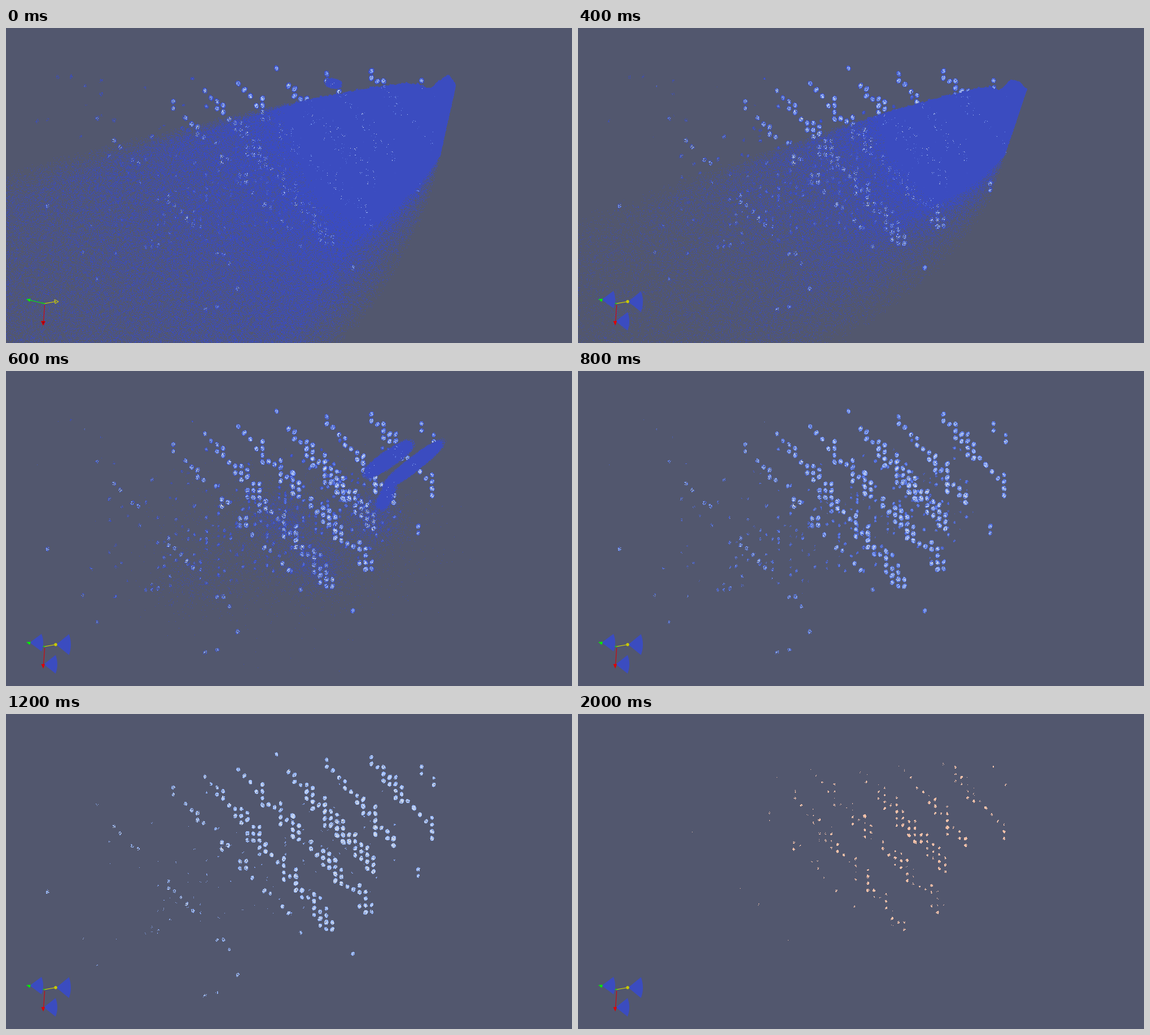
Animation, 1003 px wide and 559 px high, one loop 2100 ms. Source, as a matplotlib script:

```python
import numpy as np
import matplotlib
import matplotlib.pyplot as plt
from matplotlib.animation import FuncAnimation
from matplotlib.patches import Circle, Polygon

W, H, DPI = 1003, 559, 64
FRAMES, STEP = 21, 100
BACK = np.array([82, 87, 110], np.uint8)
BLUE = np.array([59, 76, 192], np.uint8)
DX, DY = 10.75, 12.2  # lattice pitch on screen

rng = np.random.default_rng(12)
X, Y = np.meshgrid(np.arange(W), np.arange(H))
dist = np.hypot(X - 770, Y - 110)

# Diagonal chains of clumps: x, y, steps, slope per step, longest column, share
CHAINS = [(736, 99, 5, 10.0, 1, 0.8), (647, 82, 11, 12.0, 4, 1.0),
          (568, 87, 12, 12.7, 5, 1.0), (500, 102, 15, 11.8, 4, 1.0),
          (411, 98, 23, 11.2, 3, 0.9), (352, 111, 22, 12.6, 4, 0.9),
          (296, 136, 22, 11.4, 2, 0.6), (191, 199, 20, 11.5, 1, 0.4)]
LONE = [(479, 71), (730, 275), (730, 287), (73, 315), (136, 398), (161, 445),
        (352, 499), (374, 494), (410, 462), (614, 425)]


def chain(x, y, steps, slope, longest, share):
    """Walk down a diagonal; columns get longer along the way."""
    for k in range(steps):
        rows = rng.integers(1, 2 + min(longest, 1 + k // 2))
        top = y + slope * k - DY * (rows - 1) / 2
        for r in range(rows):
            if k == 0 or rng.random() < share:
                yield x + DX * k, top + DY * r


def strength(x, y):
    """Clumps are strongest in the middle and weaken outwards."""
    dy = y - 205
    q = np.hypot((x - 620) / 1.3, dy * (1.7 if dy < 0 else 1))
    return 0.79 - 0.0011 * q + rng.normal(0, 0.07)


def weak_clumps(n):
    x = np.round((140 + 560 * rng.beta(1.8, 1.2, n)) / DX) * DX
    y = 335 - 0.2 * (x - 140) + rng.normal(0, 1, n) * (78 - 0.05 * x)
    return zip(x, y, rng.uniform(0.02, 0.26, n))


def faint_clumps(n):
    x = rng.uniform(50, 350, n)
    y = rng.uniform(85, 200, n)
    return zip(x, y, rng.uniform(-0.32, 0.04, n))


fill = np.clip(1.5 - dist / 600, 0.5, 0.94)
value = np.full((H, W), -9.0)


def add_clump(x, y, peak):
    sx, sy = rng.uniform(0.8, 1.0), rng.uniform(0.95, 1.15)
    tilt = rng.uniform(-0.2, 0.3)
    x0, y0 = max(int(x) - 9, 0), max(int(y) - 9, 0)
    box = np.s_[y0:y0 + 19, x0:x0 + 19]
    dx, dy = X[box] - x, Y[box] - y
    r = np.hypot((dx + tilt * dy) / sx, dy / sy)
    value[box] = np.maximum(value[box], peak - (r / 5.6) ** 2.5)


for c in CHAINS:
    for x, y in chain(*c):
        add_clump(x, y, strength(x, y))
for x, y in LONE:
    add_clump(x, y, min(strength(x, y), 0.5))
for x, y, peak in [*weak_clumps(260), *faint_clumps(18)]:
    add_clump(x, y, peak)

value += rng.normal(0, 1, (H, W)) * (0.04 + 0.12 * (1 - fill))
value[rng.random((H, W)) > fill] = -9
shade = rng.random((H, W)) ** 1.2
cover = rng.random((H, W))

# Half ordered, half random grain
cell = (2 * (X % 2) + 3 * (Y % 2)) % 4
grain = rng.random((H, W))
grain = np.where(rng.random((H, W)) < 0.5, (cell + grain) / 4, grain)
jag = np.repeat(rng.normal(0, 1, W // 4 + 1), 4)[:W]


def bulk(k):
    """Grain density of the whole body while it shrinks, k from 0 to 1."""
    rest = np.clip(1 - X / (700 + 35 * k), 0, 1)
    top = 97 + 4 * k + (153 + 77 * k) * rest ** 1.17 + jag
    top += np.clip(10 - np.abs(X - 748) / 2, 0, 8)
    top -= np.clip(15 - 3 * k - np.abs(X - 785 + 17 * k) / 2, 0, 15)
    top += np.clip(X - 785, 0, None) * (1 - 0.4 * k)
    low = np.clip(Y - 250, 0, None)
    side = 796 - 0.22 * (Y - 108) - 0.001 * low ** 2
    side = side - k * (15 * np.clip((Y - 108) / 130, 0, 1) + 0.0012 * low ** 2)
    over = np.clip((Y - top) / (2 + 58 * np.clip(1 - X / 530, 0, 1)), 0, 1)
    soft = 2 + (0.7 + 0.4 * k) * np.clip(Y - 225, 0, 170)
    right = np.clip((side - X) / soft, 0, 1)
    return (2.2 + k) * np.exp(-dist / (350 - 145 * k)) * over * right


def lobe(x, y, length, width, deg):
    a = np.radians(deg)
    u = ((X - x) * np.cos(a) + (Y - y) * np.sin(a)) / length
    v = ((Y - y) * np.cos(a) - (X - x) * np.sin(a)) / width
    q = (np.abs(u) ** 2.6 + np.abs(v) ** 2.6) ** (1 / 2.6)
    return np.clip((1.08 - q) * 6, 0, 2)


def haze(x, y, sx, sy, amp):
    return amp * np.exp(-((X - x) / sx) ** 2 / 2 - ((Y - y) / sy) ** 2 / 2)


REMNANT = (lobe(677, 156, 53, 15, -35) + lobe(722, 165, 67, 13, -38)
           + lobe(673, 222, 28, 14, -62) * 0.45
           + haze(650, 260, 26, 28, 0.42) + haze(490, 262, 28, 28, 0.3)
           + haze(555, 345, 26, 26, 0.3) + haze(510, 305, 100, 55, 0.09)
           + haze(340, 375, 38, 26, 0.08))


def density(i):
    if i <= 4:
        bump = lobe(580, 98, 15 - 2 * i, 9 - i, 10) * (i < 3)
        return np.maximum(bulk(i / 4), bump)
    if i == 5:
        return np.sqrt(bulk(1.25) * REMNANT)
    return REMNANT * 0.14 ** (i - 6) * (i < 8)


cmap = matplotlib.colormaps["coolwarm"]


def cloud(i):
    """Keep the points whose value passes the rising threshold."""
    limit = 0.61 - 0.0475 * (20 - i)
    low = max(limit, 0)
    img = np.empty((H, W, 3), np.uint8)
    img[:] = BACK
    d = density(i)
    img[grain < d] = BLUE
    seen = (value > limit) & (cover > 0.95 * np.minimum(d, 1))
    tone = low + (value[seen] - low) * shade[seen]
    tone = np.clip(tone, 0, max(0.48, limit + 0.03))
    img[seen] = cmap(tone, bytes=True)[:, :3]
    return img


fig = plt.figure(figsize=(W / DPI, H / DPI), dpi=DPI)
ax = fig.add_axes([0, 0, 1, 1])
ax.axis("off")
pic = ax.imshow(cloud(0), extent=(0, W, H, 0), interpolation="nearest",
                aspect="auto")
ax.set_xlim(0, W)
ax.set_ylim(H, 0)

GREEN, YELLOW, RED = "#00f000", "#d8d800", "#e00000"


def line(pts, color):
    return ax.plot(*zip(*pts), color=color, lw=1.2, zorder=3)[0]


def shape(pts, face, edge="none", z=4):
    return ax.add_patch(Polygon(pts, fc=face, ec=edge, lw=1.1, zorder=z))


def fan(x, y, w, h):
    t = np.linspace(-1, 1, 9)
    arc = np.column_stack([x + w * (1 - 0.13 * t ** 2), y + h * t])
    return shape([(x, y), *arc], BLUE / 255)


line([(68, 489), (88, 485.5)], YELLOW)
line([(68.5, 492), (66.5, 521)], RED)
line([(64, 488), (69, 489)], GREEN)
shape([(36, 481), (44, 480.5), (42, 486)], GREEN, z=6)

arrows = [line([(38, 482), (68, 489)], GREEN),
          shape([(86, 482), (93, 485.5), (87, 489)], "none", YELLOW),
          shape([(62.5, 520.5), (69.5, 520.5), (66, 527.5)], "#a00010", RED)]
fans = [fan(42, 482, 24, 15.5), fan(89, 485.5, 26, 18.5),
        fan(67, 520.5, 24, 16.5),
        shape([(62.5, 520), (69, 520), (66, 528)], RED, z=6),
        ax.add_patch(Circle((88, 485.5), 2.8, fc="#c8c800", zorder=6))]


def draw(i):
    pic.set_data(cloud(i))
    for p in arrows:
        p.set_visible(i == 0)
    for p in fans:
        p.set_visible(i > 0)
    return [pic, *arrows, *fans]


anim = FuncAnimation(fig, draw, frames=FRAMES, interval=STEP, repeat=True,
                     repeat_delay=0, blit=False)
plt.show()
```
